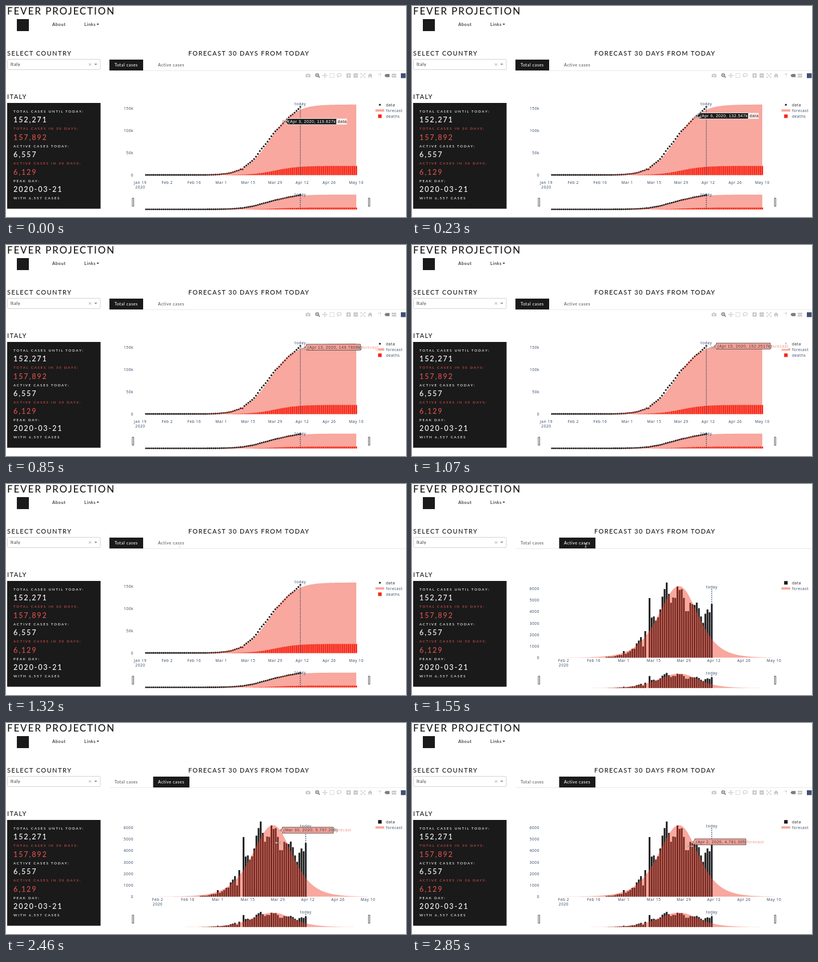
An HTML page that plays this animation: 700 px wide and 370 px high, repeating every 2.92 s.

```html
<!DOCTYPE html>
<html lang="en">
<head>
<meta charset="utf-8">
<title>Fever Projection</title>
<style>
  html, body { margin: 0; width: 100%; height: 100%; overflow: hidden; background: #fff; }
  svg { display: block; width: 700px; height: 370px; }
  text { white-space: pre; }
  .ui { font-family: Lato, sans-serif; font-weight: 500; }
  .plot { font-family: "Open Sans", sans-serif; font-size: 6.6px; letter-spacing: .55px; }
  .tip { font-family: "Liberation Sans", Arial, sans-serif; font-size: 7.15px; letter-spacing: .5px; }
</style>
</head>
<body>
<svg id="stage" viewBox="0 0 700 370" xmlns="http://www.w3.org/2000/svg">
  <g id="page"></g>
  <g id="total"></g>
  <g id="active"></g>
  <g id="tabs"></g>
  <g id="modebar"></g>
  <g id="hover"></g>
  <g id="cursor"></g>
</svg>
<script>
const LOOP = 2920, SWITCH = 1550;
const INK = '#1a1a1a', NAVY = '#2a3f5f', RED = '#d9534f', PINK = '#f8a89e';
const LAST = 109, TODAY = 80, FIRST_CASE = 31;
const MONTHS = ['Jan', 'Feb', 'Mar', 'Apr', 'May'];

// Cumulative cases per day, from 22 February
const CASES = [62, 155, 229, 322, 453, 655, 888, 1128, 1694, 2036, 2502, 3089, 3858,
  4636, 5883, 7375, 9172, 10149, 12462, 12462, 17660, 21157, 24747, 27980, 31506,
  35713, 41035, 47021, 53578, 59138, 63927, 69176, 74386, 80589, 86498, 92472, 97689,
  101739, 105792, 110574, 115242, 119827, 124632, 128948, 132547, 135586, 139422,
  143626, 147577, 152271];

const $ = id => document.getElementById(id);
const days = n => Array.from({ length: n + 1 }, (_, d) => d);
const cases = d => d < FIRST_CASE ? (d < 9 ? 0 : 3) : CASES[d - FIRST_CASE];
const newCases = d => d ? cases(d) - cases(d - 1) : 0;

// Forecast of total cases in thousands: logistic with a faster tail
const LIMIT = 158.03;
const TAIL_A = LIMIT / 144.1514 - 1, TAIL_B = LIMIT / 152.2517 - 1;
const totalForecast = d => LIMIT / (1 + (d < 79
  ? Math.exp(-.157 * (d - 64.2))
  : TAIL_A * (TAIL_B / TAIL_A) ** ((d - 79) / 5)));
// Daily forecast: a bell that falls slightly faster than it rises
const PEAK_DAY = 64.8;
const bell = d => Math.cosh((d < PEAK_DAY ? .0775 : .085) * (d - PEAK_DAY)) ** -2;
const dailyForecast = d => 4781.305 * bell(d) / bell(71);
const deaths = d => 20.6 / (1 + Math.exp(-.165 * (d - 67)));

const xTotal = d => 245.1 + 3.375 * d;
const xActive = d => 224.2 + 3.755 * d;

const rect = (x, y, w, h, fill, more = '') =>
  `<rect x="${x}" y="${y}" width="${w}" height="${h}" fill="${fill}" ${more}/>`;
const path = (d, fill, more = '') => `<path d="${d}" fill="${fill}" ${more}/>`;
const line = (d, color, width = 1, more = '') =>
  path(d, 'none', `stroke="${color}" stroke-width="${width}" ${more}`);
const label = (x, y, s, size, gap, fill = INK) =>
  `<text class="ui" x="${x}" y="${y}" font-size="${size}" letter-spacing="${gap}" fill="${fill}">${s}</text>`;
const tick = (x, y, s, anchor = 'middle', fill = NAVY) =>
  `<text class="plot" x="${x}" y="${y}" text-anchor="${anchor}" fill="${fill}">${s}</text>`;

function dayName(d) {
  const date = new Date(Date.UTC(2020, 0, 22 + d));
  return MONTHS[date.getUTCMonth()] + ' ' + date.getUTCDate();
}

function page() {
  const stats = [
    ['TOTAL CASES UNTIL TODAY:', '152,271', '#fff'],
    ['TOTAL CASES IN 30 DAYS:', '157,892', RED],
    ['ACTIVE CASES TODAY:', '6,557', '#fff'],
    ['ACTIVE CASES IN 30 DAYS:', '6,129', RED],
    ['PEAK DAY:', '2020-03-21', '#fff']
  ];
  return label(2, 14.5, 'FEVER PROJECTION', 17, 1.85)
    + rect(19, 23, 21, 21, INK)
    + label(81, 35, 'About', 7.5, .6)
    + label(137, 35, 'Links', 7.5, .6)
    + path('M158.5 31h4.4l-2.2 2.3z', INK)
    + label(2, 87, 'SELECT COUNTRY', 11, 1.45)
    + label(319, 87, 'FORECAST 30 DAYS FROM TODAY', 11, 1.38)
    + rect(2.5, 93.5, 162.5, 18, '#fff', 'stroke="#d2d2d2" rx="2"')
    + label(8, 105, 'Italy', 7.5, .6, '#333')
    + line('M145 100.5l4 4m0-4l-4 4', '#999', .9)
    + path('M154.2 101h5.6l-2.8 3z', '#999')
    + label(2, 163, 'ITALY', 11, 1.4)
    + rect(2, 170, 163.5, 185.5, INK)
    + stats.map(([name, value, fill], i) =>
        label(13, 186.6 + 30.5 * i, name, 6.2, 1.75, fill)
        + label(13, 204.1 + 30.5 * i, value, 12.6, 1.85, fill)).join('')
    + label(13, 339.1, 'WITH 6,557 CASES', 6.2, 1.75, '#fff');
}

function area(x, y0, scale, value) {
  const pts = days(LAST * 2).map(i =>
    `${x(i / 2).toFixed(2)} ${(y0 - scale * value(i / 2)).toFixed(2)}`);
  return path(`M${x(0)} ${y0}L${pts.join('L')}L${x(LAST)} ${y0}z`, 'rgb(240,62,40)', 'fill-opacity=".45"');
}

function bars(x, y0, scale, value, last, width, fill) {
  const d = days(last).filter(i => scale * value(i) > .25).map(i => {
    const h = scale * value(i);
    return `M${(x(i) - width / 2).toFixed(2)} ${y0}v${-h.toFixed(2)}h${width}v${h.toFixed(2)}z`;
  });
  return path(d.join(''), fill);
}

const dots = (y0, scale) => days(TODAY).map(d =>
  `<circle cx="${xTotal(d)}" cy="${y0 - scale * cases(d) / 1000}" r="1.6" fill="${INK}"/>`).join('');

const todayMark = (x, top, y0, text) =>
  line(`M${x} ${top}V${y0}`, NAVY, 1.1, 'stroke-dasharray="1.9 1.6"') + tick(x, text, 'today');

function totalLayer(y0, scale, top, text) {
  return bars(xTotal, y0, scale, deaths, LAST, 2.7, '#ff140a')
    + dots(y0 - .3, scale)
    + area(xTotal, y0, scale, totalForecast)
    + todayMark(xTotal(TODAY), top, y0, text);
}

function activeLayer(y0, scale, top, text) {
  return bars(xActive, y0, scale, newCases, TODAY, 3, INK)
    + area(xActive, y0, scale, dailyForecast)
    + todayMark(xActive(TODAY), top, y0, text);
}

const handles = [221, 634.3].map(x =>
  rect(x, 337, 2.4, 14, '#fff', 'stroke="#444" stroke-width=".9"')).join('');

const xTicks = (x, first) => days(8).map(i => 14 * i - 3).filter(d => d >= first)
  .map(d => tick(x(d), 312.3, dayName(d))).join('') + tick(x(first), 320, '2020');

const legend = (mark, third = '') => mark
  + tick(665, 175.7, 'data', 'start', INK)
  + line('M646.5 183.2H662', PINK, 4)
  + tick(665, 185.7, 'forecast', 'start') + third;

function totalChart() {
  const yTicks = days(3).map(i =>
    tick(223, 299 - 39.15 * i, i ? 50 * i + 'k' : '0', 'end')).join('');
  return totalLayer(296.5, .783, 176, 174) + totalLayer(356.8, .165, 333, 333)
    + yTicks + xTicks(xTotal, -3) + handles
    + legend(`<circle cx="654.3" cy="173.2" r="1.6" fill="${INK}"/>`,
        rect(651.2, 190.2, 6.2, 6.2, '#f82717') + tick(665, 195.6, 'deaths', 'start'));
}

function activeChart() {
  const yTicks = days(6).map(i => tick(223, 306.8 - 20.1 * i, 1000 * i, 'end')).join('');
  return activeLayer(304.5, .0201, 184, 183) + activeLayer(357.8, .00405, 335, 334)
    + yTicks + xTicks(xActive, 11) + handles
    + legend(rect(651.2, 170.2, 6.2, 6.2, INK));
}

function tabs(second) {
  return line('M181 113.3H700', '#e6e6e6', .9)
    + (second ? rect(257.5, 94, 63.5, 19, INK) : rect(181, 94, 59, 19, INK))
    + label(190, 106, 'Total cases', 7.3, .55, second ? '#555' : '#fff')
    + label(266, 106, 'Active cases', 7.3, .55, second ? '#fff' : '#555');
}

function modebar() {
  const dim = '#c7c7c7', on = '#7c7c7c';
  return rect(524.5, 119.5, 8.2, 5.6, dim, 'rx="1"') + rect(527, 118.6, 3, 1.5, dim)
    + '<circle cx="528.6" cy="122.3" r="1.7" fill="#fff"/><circle cx="528.6" cy="122.3" r=".9" fill="' + dim + '"/>'
    + '<circle cx="544.6" cy="121.2" r="2.6" fill="none" stroke="' + on + '" stroke-width="1.4"/>'
    + line('M546.5 123.2l2.6 2.5', on, 1.6) + line('M543.3 121.2h2.6m-1.3-1.3v2.6', on, .7)
    + line('M554 122h8m-4-4v8', dim, 1)
    + path('M553.4 122l1.9-1.6v3.2zM562.6 122l-1.9-1.6v3.2zM558 117.4l-1.6 1.9h3.2zM558 126.6l-1.6-1.9h3.2z', dim)
    + rect(566.8, 118.4, 7.2, 7.2, 'none', `stroke="${dim}" stroke-dasharray="1.5 .9"`)
    + '<ellipse cx="583.2" cy="120.9" rx="3.6" ry="2.4" fill="none" stroke="' + dim + '" stroke-width="1.1"/>'
    + line('M580.6 122.4q-1 1.6 .8 3.4', dim)
    + rect(595.8, 118.2, 7.4, 7.4, dim) + line('M597.4 121.9h4.2m-2.1-2.1v4.2', '#fff')
    + rect(608.3, 118.2, 7.4, 7.4, dim) + line('M609.9 121.9h4.2', '#fff')
    + line('M621 118.4l7.2 7.2m0-7.2l-7.2 7.2', dim, .9)
    + path('M620.5 118v2.4l2.4-2.4zM628.7 118v2.4l-2.4-2.4zM620.5 126v-2.4l2.4 2.4zM628.7 126v-2.4l-2.4 2.4z', dim)
    + path('M633 122.2l4.2-4.1 4.2 4.1h-1.2v3.5h-2v-2.4h-2v2.4h-2v-3.5z', dim)
    + line('M650.5 119.4h4.6v6', dim, .9, 'stroke-dasharray="1.6 1"') + rect(654.3, 118.4, 1.8, 1.8, dim)
    + path('M662.3 122l2.4-2.7h6.5v5.4h-6.5z', on)
    + rect(675, 118.8, 8, 2.8, dim) + rect(675, 122.6, 8, 2.8, dim)
    + rect(691, 118, 8.4, 8.4, '#3f4f75');
}

function tooltip(x, y, value, name, fill, color, edge, width) {
  const l = x + 4, r = l + width, nameWidth = name === 'data' ? 18 : 31;
  return rect(r, y - 5.3, nameWidth, 10.6, '#fff', 'fill-opacity=".8"')
    + `<text class="tip" x="${r + 2}" y="${y + 2.5}" fill="${name === 'data' ? INK : '#f29488'}">${name}</text>`
    + path(`M${x} ${y}L${l} ${y - 3}V${y - 5.3}H${r}V${y + 5.3}H${l}V${y + 3}z`, fill,
        `stroke="${edge}" stroke-width=".8"`)
    + `<text class="tip" x="${l + 2}" y="${y + 2.5}" fill="${color}">${value}</text>`;
}

function hover(t, cx) {
  if (t < 1150) {
    const d = Math.round((cx - 245.1) / 3.375), known = d < 79;
    const k = known ? cases(d) / 1000 : totalForecast(d);
    const text = `(${dayName(d)}, 2020, ${k.toFixed(known ? 3 : 4)}k)`;
    const y = 296.5 - .783 * k;
    return known
      ? tooltip(xTotal(d), y, text, 'data', INK, '#fff', '#fff', 86.5)
      : tooltip(xTotal(d), y, text, 'forecast', '#f3a097', '#444', '#444', 94.5);
  }
  if (t < 2460) return '';
  const d = Math.round((cx - 220) / 3.755), v = dailyForecast(d);
  const text = `(${dayName(d)}, 2020, ${v.toLocaleString('en-US', { minimumFractionDigits: 3, maximumFractionDigits: 3 })})`;
  return tooltip(xActive(d), 304.5 - .0201 * v, text, 'forecast', '#f3a097', '#444', '#444', 89.5);
}

// Moments at which the screen refreshes
const STEPS = [0, 80, 150, 230, 380, 460, 540, 620, 690, 770, 850, 920, 1000, 1070, 1150,
  1230, 1320, 1550, 1840, 1920, 2000, 2220, 2310, 2380, 2460, 2540, 2620, 2700, 2850];
// Pointer route: time, x, y
const ROUTE = [[0, 489, 202], [230, 499.5, 195], [620, 512.5, 184], [1070, 528, 180],
  [1320, 304, 108], [1780, 304, 108], [2000, 467, 203], [2220, 469, 205], [2700, 485, 215], [2850, 486, 216]];

function pointer(t) {
  const i = ROUTE.findIndex(p => p[0] > t);
  if (i < 0) return ROUTE[ROUTE.length - 1].slice(1);
  const a = ROUTE[i - 1], b = ROUTE[i], u = (t - a[0]) / (b[0] - a[0]);
  return [a[1] + (b[1] - a[1]) * u, a[2] + (b[2] - a[2]) * u];
}

function cursor(x, y) {
  const at = shape => `<g transform="translate(${x} ${y})">${shape}</g>`;
  if (y < 113) return at(line('M-1.6-3.5h3.2M0-3.5v6.5M-1.6 3h3.2', '#ddd', .9));
  const edge = 'stroke="#444" stroke-width=".4"';
  if (y < 165) return at(path('M0 0v8.5l2-1.8 1.4 3 1.3-.6-1.4-2.9h2.7z', '#fff', edge));
  return at(path('M-6 0l2.4-2v1.4h7.2v-1.4l2.4 2-2.4 2v-1.4h-7.2v1.4z', '#fff', edge));
}

$('page').innerHTML = page();
$('total').innerHTML = totalChart();
$('active').innerHTML = activeChart();
$('modebar').innerHTML = modebar();

const show = (id, on) => { $(id).style.display = on ? '' : 'none'; };
let shown = -1;

function draw(now) {
  const time = now % LOOP;
  const t = STEPS.filter(s => s <= time).pop() || 0;
  if (t !== shown) {
    shown = t;
    const [x, y] = pointer(t), second = t >= SWITCH;
    show('total', !second);
    show('active', second);
    show('modebar', t < 1230 || t >= 1920);
    $('tabs').innerHTML = tabs(second);
    $('hover').innerHTML = hover(t, x);
    $('cursor').innerHTML = cursor(x, y);
  }
}

const start = performance.now();
function loop() {
  draw(performance.now() - start);
  requestAnimationFrame(loop);
}
loop();
</script>
</body>
</html>
```
